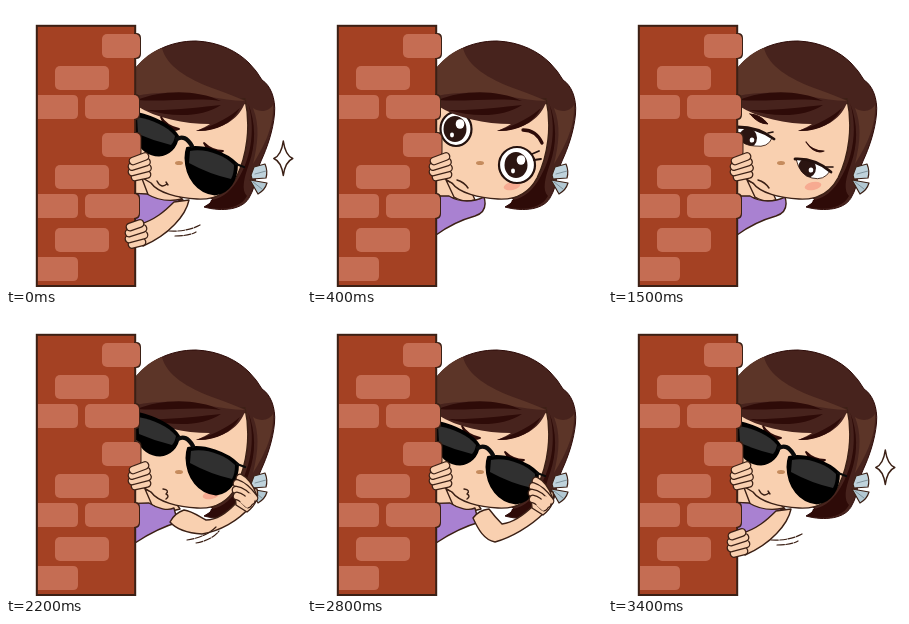
These frames come from a looping animation (295x281 px, 4.1 s). An HTML page:

```html
<!DOCTYPE html>
<html lang="en">
<head>
<meta charset="utf-8">
<title>Peeking girl</title>
<style>
html, body { margin: 0; width: 100%; height: 100%; overflow: hidden; background: #fff; }
svg { display: block; width: 100vw; height: 100vh; }
</style>
</head>
<body>
<svg id="stage" viewBox="0 0 295 281"></svg>
<script>
const INK = '#3b2015', SKIN = '#f9d0b0', HAIR = '#47231d', MID = '#5c3528', DEEP = '#2e0b08';
const LILAC = '#a981d1', BRICK = '#c56d53';

const path = (d, fill = 'none', stroke = 'none', w = 1.4, extra = '') =>
  `<path d="${d}" fill="${fill}" stroke="${stroke}" stroke-width="${w}" stroke-linecap="round" stroke-linejoin="round" ${extra}/>`;
const oval = (x, y, rx, ry, fill, stroke = 'none', w = 1.3, extra = '') =>
  `<ellipse cx="${x}" cy="${y}" rx="${rx}" ry="${ry}" fill="${fill}" stroke="${stroke}" stroke-width="${w}" ${extra}/>`;
const part = (name, body, move = '') => `<g data-part="${name}" transform="${move}">${body}</g>`;
const skin = d => path(d, SKIN, INK);
const finger = d => path(d, 'none', INK, 8.8) + path(d, 'none', SKIN, 6.2);

function wall() {
  const out = [[96, 28, 38], [79, 89, 54], [96, 127, 38.5], [79, 188, 54]];
  const flat = [[49, 60, 54], [49, 159, 54], [49, 222, 54]];
  const cut = [89, 188, 251];
  const brick = ([x, y, w]) => `<rect x="${x}" y="${y}" width="${w}" height="24" rx="5" fill="${BRICK}"/>`;
  const edge = ([x, y, w]) => {
    const r = x + w;
    return path(`M129 ${y} H${r - 4} Q${r} ${y} ${r} ${y + 4} V${y + 20} Q${r} ${y + 24} ${r - 4} ${y + 24} H129`, BRICK, INK, 2);
  };
  return `<rect x="30.8" y="19.8" width="98.4" height="260.2" fill="#a44123" stroke="${INK}" stroke-width="2"/>` +
    flat.map(brick).join('') + out.map(edge).join('') + out.map(brick).join('') +
    cut.map(y => path(`M32 ${y} H67 Q72 ${y} 72 ${y + 5} V${y + 19} Q72 ${y + 24} 67 ${y + 24} H32Z`, BRICK)).join('');
}

const hair = () =>
  path('M122 72 C140 45 165 35 190 35 C214 36 232 46 243 57 Q251 65 256 74 C264 79 270 92 268.5 108 C267 125 261 142 255 155 C249 168 250 180 244 190 C238 204 216 206 198 201 Q204 198 207 194 L122 120Z', HAIR, DEEP, 1) +
  path('M242 97 C249 119 247 150 231 175 C223 188 213 193 205 194 Q204 198 199 201 C218 205 235 202 241 190 C235 184 238 172 243 158 C250 138 250 117 242 97Z', DEEP) +
  path('M247 102 C256 108 264 104 267 99 C268 123 256 143 247 158 C252 138 254 119 247 102Z', MID);

const face = () =>
  skin('M100 96 L239 93 C245 120 241 150 230 172 C222 187 208 194 191 193 C172 192 152 187 145 177 L100 150Z') +
  oval(173, 157, 4, 2, '#c58b5d');

const fringe = () =>
  path('M100 84 C160 60 205 80 239 94 Q240 97 238 99 C232 113 217 124 190 125 Q200 121 204 118 C178 118 150 112 131 100 L100 100Z', HAIR) +
  path('M122 72 C133 55 144 46 156 42 C160 60 182 73 206 82 Q226 89 239 95 C205 94 168 79 122 92Z', MID) +
  path('M131 94 C155 84 190 83 215 95 C190 91 160 96 131 94Z', DEEP) +
  path('M141 104 C165 105 195 101 215 99 C196 112 165 111 141 104Z', DEEP) +
  path('M190 125 C210 119 225 110 234 102 C226 118 209 126 190 125Z', DEEP);

const ribbon = () =>
  path('M245 169 L248 161 L259 158 Q262 165 260 172 L246 173Z', '#bfd3dc', INK, 1.2) +
  path('M244 174 L261 177 Q259 184 252 188Z', '#b2c8d2', INK, 1.2) +
  path('M249 168 L260 165 M247 176 L256 183', 'none', '#71868f', .8);

const wideEyes = () => [[149, 123, 15.5, 17], [210, 159, 18, 18]].map(([x, y, rx, ry]) =>
  oval(x, y, rx, ry, '#fff', '#24110d', 2.2) + oval(x - 1, y, 11.5, 13, '#2b1511') +
  oval(x + 4, y - 5, 4.3, 4.8, '#fff') + oval(x - 4, y + 6, 2, 2.4, '#fff')).join('') +
  path('M138 100 Q153 96 163 107', 'none', DEEP, 3) + path('M216 124 Q229 124 235 137', 'none', DEEP, 3.3) +
  path('M225 148 L232 145 M227 154 L234 153', 'none', '#24110d', 1.8);

// Half-closed eyes; dx, dy move the pupils.
function tiredEyes(dx, dy) {
  const eye = (white, lid, x, y, id) =>
    `<clipPath id="${id}"><path d="${white}"/></clipPath>` + path(white, '#fff', INK, .9) +
    `<g clip-path="url(#${id})">` + oval(x + dx, y + dy, 9, 10, '#2b1511') +
    oval(x + dx + 4, y + dy + 2, 2.3, 2.6, '#fff') + '</g>' + path(lid, 'none', '#24110d', 2.8);
  const id = `e${dx + 20}${dy + 20}`;
  return eye('M130 122 Q150 122 164 132 Q160 142 147 140 Q136 140 130 132Z', 'M130 121 Q150 121 166 133', 147, 130, id + 'a') +
    eye('M188 153 Q207 153 222 165 Q216 175 204 172 Q192 170 188 153Z', 'M187 153 Q207 152 223 166', 206, 160, id + 'b') +
    path('M218 161 L225 161 M160 127 L165 126', 'none', '#24110d', 1.6);
}

const brows = () =>
  path('M142 108 Q152 108 160 118 Q150 118 142 108Z', DEEP, DEEP, 1) +
  path('M198 136 Q204 145 216 145 Q207 149 198 136Z', DEEP, DEEP, 1.2);
const shadeBrows = () =>
  path('M155 111 Q160 120 173 123 Q161 128 155 111Z', DEEP, DEEP, 1.8) +
  path('M198 137 Q206 145 217 145 Q206 153 198 137Z', DEEP, DEEP, 1.8);

const shades = () =>
  path('M100 104 L131 107 C148 111 165 119 172 130 C171 142 162 149 153 149.5 C142 149 135 143 131 134 L100 130Z', '#000', '#000', 2) +
  path('M181 142 C196 138 221 147 231 158 C231 174 223 187 209 188.5 C192 187 180 172 179.5 152 Q179.5 146 181 142Z', '#000', '#000', 2) +
  path('M131 111 C147 114 161 120 169 130 Q168 136 165 139 Q148 135 132 128Z', '#303030') +
  path('M184 145 C199 142 218 149 228 159 Q228 168 225 173 Q203 168 183 157Z', '#303030') +
  path('M171 133 Q179 128 186 140', 'none', '#0a0a0a', 4.2) + path('M230 158 L238 161', 'none', '#0a0a0a', 2.4);

// Forearm of the hand that holds the wall.
const forearm = () => skin('M100 165 H145 L149 192 L100 192Z');
const restDress = () => forearm() +
  skin('M139 174 L147 191 Q157 197 168 194 L165 187Z') +
  path('M100 190 L142 190 C153 197 167 196 177 191 C180 201 177 207 168 210 C150 215 140 221 129 229 L100 240Z', LILAC, INK);
const tankDress = () => forearm() +
  skin('M139 174 L146 190 Q160 199 174 194 L170 188Z') +
  path('M100 189 L143 188 C152 194 162 196 168 193 Q170 202 173 207 C155 212 141 220 129 228 L100 240Z', LILAC, INK);
const leanDress = () => forearm() +
  skin('M135 170 L143 191 Q158 198 177 194 L170 187Z') +
  path('M100 186 L141 188 C151 194 163 196 176 193 C164 201 153 211 143 216 L129 220 L100 230Z', LILAC, INK);

const swish = d => path(d, 'none', INK, 1.2, 'stroke-dasharray="7 1.5"');
const raisedHand = () =>
  skin('M230 190 Q228 179 235 171 L251 174 Q254 187 241 197Z') +
  finger('M247 181 Q242 167 234 163') + finger('M248 183 Q239 171 231 168.5') +
  finger('M245 186 Q238 176 230 175') + finger('M242 189 Q236 182 231 181') +
  path('M234 187 L243 178 L250 181 Q250 187 241 193Z', SKIN);
const highArm = () =>
  skin('M164 207 C170 214 180 218 196 219 C214 216 232 206 244 192 L231 187 C222 197 212 205 200 205 C194 202 186 196 178 195 C172 197 167 201 164 207Z') + raisedHand() +
  swish('M181 225 Q200 222 210 212') + swish('M190 228 Q206 225 213 216');
const lowArm = () =>
  skin('M166 203 C171 214 177 225 188 227 C203 223 223 212 238 197 L227 190 C215 202 203 208 195 209 Q188 202 182 194 Q172 195 166 203Z') +
  `<g transform="translate(-5 3)">${raisedHand()}</g>`;
const wallArm = () => skin('M183 194 C180 209 163 229 137 240 L132 219 C149 214 159 205 168 196Z');
const reachArm = () =>
  skin('M177 197 C181 214 177 231 168 244 L157 239 C163 228 164 216 162 206Z') +
  path('M132 241 L156 247 Q157 261 145 261 Q133 257 132 241Z M161 249 L182 253 Q180 265 171 264 Q161 262 161 249Z', '#181818', '#050505', 1.2) +
  path('M155 248 L162 250', 'none', '#111', 2.5) +
  finger('M167 241 L157 247') + finger('M168 245 L160 251');

const grip = () => ['M129 171 L141 168.5', 'M126 166 L141.5 162', 'M126 160.5 L140.5 156', 'M127 155 L139 150.5'].map(finger).join('');
const lowGrip = () => ['M126 238.5 L136 236', 'M123 233 L138 229', 'M123 227 L137 222.5', 'M124 221 L134 217.5'].map(finger).join('');

document.getElementById('stage').innerHTML =
  '<clipPath id="open"><rect x="129.5" width="166" height="281"/></clipPath><g clip-path="url(#open)"><g id="girl">' +
  part('rest', restDress()) + part('tank', tankDress()) + part('lean', leanDress()) + part('wallArm', wallArm()) +
  hair() + face() +
  part('blush', oval(205, 180, 8.5, 4, '#f7aa91', 'none', 0, 'transform="rotate(-12 205 180)"')) +
  part('wide', wideEyes()) + part('left', tiredEyes(-7, 2)) + part('right', tiredEyes(6, 2)) + part('down', tiredEyes(-2, 7)) +
  fringe() + ribbon() + part('brows', brows()) +
  part('high', shades(), 'translate(1 -9)') + part('low', shadeBrows() + shades()) +
  part('frown', path('M150 174 Q157 176 161 182', 'none', INK, 1.5)) +
  part('pout', path('M157 174 Q164 175 160 179 Q164 181 160 184', 'none', INK, 1.4)) +
  part('smile', path('M151 175 Q155 183 161 178 M160 176 L162 179', 'none', INK, 1.4)) +
  part('highArm', highArm()) + part('lowArm', lowArm()) + part('reach', reachArm()) +
  part('swish', swish('M163 225 Q181 226 194 219') + swish('M169 230 Q183 230 190 226')) +
  '</g></g>' + wall() + part('grip', grip()) + part('lowGrip', lowGrip()) +
  `<g id="star">${path('M0 -17.5 Q2 -3 9.5 0 Q2 3 0 17 Q-2 3 -9.5 0 Q-2 -3 0 -17.5Z', '#fff', INK, 1.5)}</g>`;

const calm = 'rest blush wide frown', tired = 'rest blush brows frown grip ';
const cool = 'lean wallArm low smile grip lowGrip swish';
const dressUp = 'tank pout grip ';
const lift = dressUp + 'blush high highArm', settle = dressUp + 'low lowArm';
// start, sideways shift, visible parts, star size
const poses = [
  [0, 0, cool, 1],
  [100, -76, calm, 0],
  [200, -38, calm, 0],
  [300, 0, calm, 0],
  [400, 0, calm + ' grip', 0],
  [900, 0, tired + 'right', 0],
  [1100, 0, tired + 'left', 0],
  [1300, 0, tired + 'right', 0],
  [1500, 0, tired + 'left', 0],
  [1700, 0, tired + 'down reach', 0],
  [2200, 0, lift, 0],
  [2400, 0, settle, 0],
  [2600, 0, lift, 0],
  [2800, 0, settle, 0],
  [3000, 0, cool, 0],
  [3200, 0, cool, .5],
  [3300, 0, cool, 1.7],
  [3400, 0, cool, 1]
];

const parts = [...document.querySelectorAll('[data-part]')];
const girl = document.getElementById('girl'), star = document.getElementById('star');
let shown;

function draw(ms) {
  const pose = poses.findLast(p => p[0] <= ms % 4100);
  if (pose === shown) return;
  shown = pose;
  const [, shift, names, size] = pose, on = names.split(' ');
  girl.setAttribute('transform', `translate(${shift} 0)`);
  for (const p of parts) p.style.display = on.includes(p.dataset.part) ? '' : 'none';
  star.style.display = size ? '' : 'none';
  star.setAttribute('transform', `translate(277.3 152.5) scale(${size})`);
}

const start = performance.now();
function tick() {
  draw(performance.now() - start);
  requestAnimationFrame(tick);
}
tick();
</script>
</body>
</html>
```
